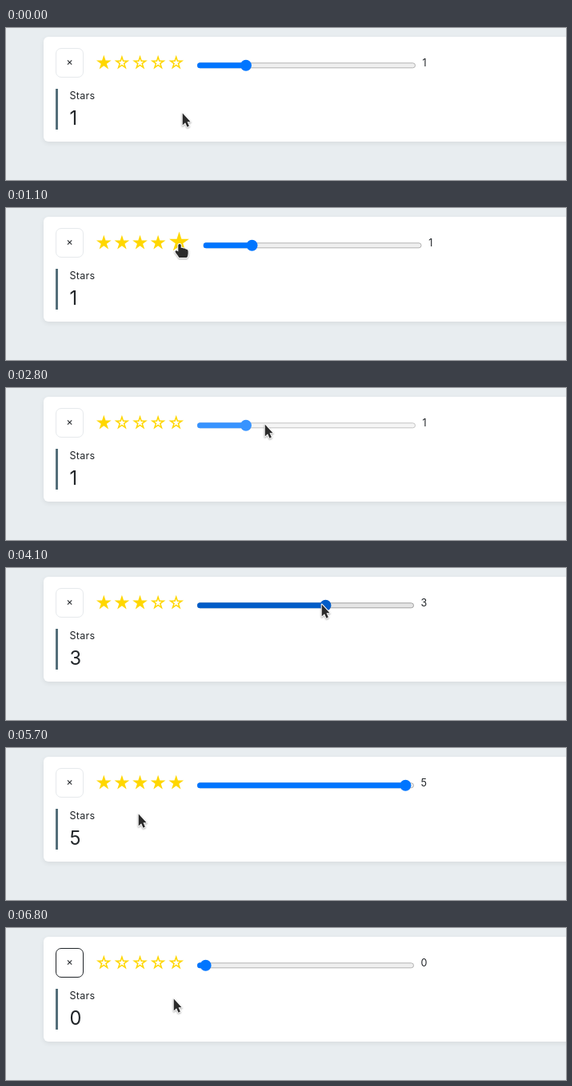
Animation, 700 px wide and 190 px high, one loop 7400 ms. Source, as an HTML page with a canvas:

```html
<!DOCTYPE html>
<html lang="en">
<head>
<meta charset="utf-8">
<title>Star rating</title>
<style>
html, body { margin: 0; width: 100%; height: 100%; overflow: hidden; background: #e8edf0; }
canvas { display: block; width: 700px; height: 190px; }
</style>
</head>
<body>
<canvas id="stage"></canvas>
<script>
const LOOP = 7400, STEP = 100;
const canvas = document.getElementById('stage');
const ctx = canvas.getContext('2d');
const dpr = window.devicePixelRatio || 1;
canvas.width = 700 * dpr;
canvas.height = 190 * dpr;

// Pointer strokes
const START = { x: 220, y: 106 };
const MOVES = [
  { from: 100, to: 800, x: 146, y: 48 },
  { from: 800, to: 1100, x: 217, y: 45 },
  { from: 1200, to: 1400, x: 184, y: 45 },
  { from: 1500, to: 1800, x: 221, y: 46 },
  { from: 1900, to: 2700, x: 323, y: 45 },
  { from: 2800, to: 3000, x: 337, y: 45 },
  { from: 3300, to: 3600, x: 394, y: 45 },
  { from: 4300, to: 4900, x: 217, y: 46 },
  { from: 5300, to: 5700, x: 165, y: 82 },
  { from: 5700, to: 6000, x: 81, y: 44 },
  { from: 6300, to: 6800, x: 209, y: 88 }
];

// Mouse events
const PRESS = 2800, RELEASE = 4100, PICK = 5100, FOCUS = 6000, CLEAR = 6300;

const SLOT = 22.6, BIG = 4 / 3, STARS_X = 111;
const SLIDER_X = 239, SLIDER_Y = 46.8, THUMB_PAD = 10.6;
const THEME = {
  normal: { fill: '#0075ff', track: '#efefef', edge: '#b2b2b2' },
  hover: { fill: '#005cc8', track: '#e5e5e5', edge: '#a0a0a0' },
  active: { fill: '#3793ff', track: '#f5f5f5', edge: '#c4c4c4' }
};

const clamp = (v, lo, hi) => Math.min(hi, Math.max(lo, v));
const ease = k => k * (1.5 - 0.5 * k);
const inside = (p, l, t, r, b) => p.x >= l && p.x <= r && p.y >= t && p.y <= b;

function pointerAt(t) {
  let { x, y } = START;
  for (const m of MOVES) {
    const k = ease(clamp((t - m.from) / (m.to - m.from), 0, 1));
    x += (m.x - x) * k;
    y += (m.y - y) * k;
  }
  return { x, y };
}

function valueAt(t) {
  if (t >= CLEAR) return 0;
  if (t >= PICK) return 5;
  if (t < PRESS) return 1;
  const x = pointerAt(Math.min(t, RELEASE)).x;
  return Math.round((x - SLIDER_X - THUMB_PAD) / 50);
}

function box(x, y, w, h, r) {
  ctx.beginPath();
  ctx.roundRect(x, y, w, h, r);
}

function text(str, x, y, size, spacing = 0) {
  ctx.font = `${size}px Inter, sans-serif`;
  ctx.letterSpacing = `${spacing}px`;
  ctx.fillStyle = '#212529';
  ctx.fillText(str, x, y);
}

function star(cx, cy, r, filled) {
  ctx.save();
  ctx.beginPath();
  for (let i = 0; i < 10; i++) {
    const a = i * Math.PI / 5, d = i % 2 ? r * 0.382 : r;
    ctx.lineTo(cx + d * Math.sin(a), cy - d * Math.cos(a));
  }
  ctx.closePath();
  if (filled) {
    ctx.fillStyle = '#ffd700';
    ctx.fill();
  } else {
    ctx.clip();
    ctx.strokeStyle = '#ffd700';
    ctx.lineWidth = 3;
    ctx.stroke();
  }
  ctx.restore();
}

function drawStars(value, hovered) {
  let x = STARS_X;
  for (let i = 1; i <= 5; i++) {
    const scale = i === hovered ? BIG : 1, w = SLOT * scale;
    star(x + w / 2, 46 - 2.5 * scale, 9.8 * scale, i <= (hovered || value));
    x += w;
  }
}

function drawSlider(x, end, thumbX, theme, thumbTheme) {
  const { fill, track, edge } = THEME[theme];
  const w = end - x;
  box(x + 0.5, SLIDER_Y - 3, w - 1, 6, 3);
  ctx.fillStyle = track;
  ctx.fill();
  ctx.strokeStyle = edge;
  ctx.lineWidth = 1;
  ctx.stroke();
  ctx.save();
  ctx.beginPath();
  ctx.rect(x, 40, thumbX - x, 14);
  ctx.clip();
  box(x, SLIDER_Y - 3.5, w, 7, 3.5);
  ctx.fillStyle = fill;
  ctx.fill();
  ctx.restore();
  ctx.beginPath();
  ctx.arc(thumbX, SLIDER_Y, 7, 0, 2 * Math.PI);
  ctx.fillStyle = THEME[thumbTheme].fill;
  ctx.fill();
}

const ARROW = new Path2D('M.7 .5 V15.5 L4.1 12.3 L6.5 17.7 L8.9 16.6 L6.5 11.3 H10.6 Z');
const HAND = new Path2D('M-1.7 9 V1.5 Q-1.7 0 0 0 T1.7 1.5 V5 Q3.5 4.2 4.8 5.6 ' +
  'Q6.6 5 7.8 6.5 Q10.6 6.3 10.6 9 V12 Q10.6 14.5 9 17 H-.6 Q-2 14.5 -4.7 11.2 ' +
  'Q-6.2 9.3 -5 8.5 Q-3.8 7.8 -1.7 9.6 Z');

function drawPointer({ x, y }, shape) {
  ctx.save();
  ctx.translate(x, y);
  ctx.lineJoin = 'round';
  ctx.shadowColor = 'rgba(0,0,0,.35)';
  ctx.shadowBlur = 2 * dpr;
  ctx.shadowOffsetY = dpr;
  ctx.strokeStyle = '#fff';
  ctx.lineWidth = 2;
  ctx.stroke(shape);
  ctx.shadowColor = 'transparent';
  ctx.fillStyle = '#2b2b2b';
  ctx.fill(shape);
  ctx.restore();
}

function drawCard() {
  ctx.fillStyle = '#e8edf0';
  ctx.fillRect(0, 0, 700, 190);
  ctx.save();
  ctx.shadowColor = 'rgba(0,0,0,.075)';
  ctx.shadowBlur = 6 * dpr;
  ctx.shadowOffsetY = 2 * dpr;
  box(47, 11, 720, 131, 6);
  ctx.fillStyle = '#fff';
  ctx.fill();
  ctx.restore();
}

function drawButton(focused) {
  box(62.5, 25.5, 34, 36, 6.5);
  ctx.strokeStyle = focused ? '#212529' : '#e6e9ec';
  ctx.lineWidth = 1;
  ctx.stroke();
  ctx.textAlign = 'center';
  text('×', 79.5, 47, 13);
  ctx.textAlign = 'left';
}

function draw(t) {
  const p = pointerAt(t), value = valueAt(t);
  const onStars = inside(p, STARS_X, 30, 224, 54);
  const onButton = inside(p, 62, 25, 97, 62);
  const hovered = onStars ? clamp(Math.ceil((p.x - STARS_X) / SLOT), 1, 5) : 0;
  const shift = hovered ? SLOT * (BIG - 1) : 0;

  const end = value === 1 ? 512 : 510;
  const thumbX = SLIDER_X + THUMB_PAD + value / 5 * (end - SLIDER_X - 2 * THUMB_PAD);
  const dragging = t >= PRESS && t < RELEASE;
  const onSlider = inside(p, SLIDER_X, 39, end, 55);
  const onThumb = onSlider && Math.abs(p.x - thumbX) < 7;
  const themeFor = over => dragging ? 'active' : over ? 'hover' : 'normal';

  ctx.setTransform(dpr, 0, 0, dpr, 0, 0);
  drawCard();
  drawButton(t >= FOCUS);
  drawStars(value, hovered);
  drawSlider(SLIDER_X + shift, end + shift, thumbX + shift, themeFor(onSlider), themeFor(onThumb));
  text(value, end + 8.6 + shift, 48.3, 12.6);

  ctx.fillStyle = '#546e7a';
  ctx.fillRect(62, 76, 3, 51);
  text('Stars', 79.5, 89, 12.5, 0.25);
  text(value, 79.5, 121.4, 23.6);

  drawPointer(p, onStars || onButton ? HAND : ARROW);
}

function tick() {
  const t = performance.now() % LOOP;
  draw(Math.floor(t / STEP) * STEP);
  requestAnimationFrame(tick);
}
tick();
</script>
</body>
</html>
```
